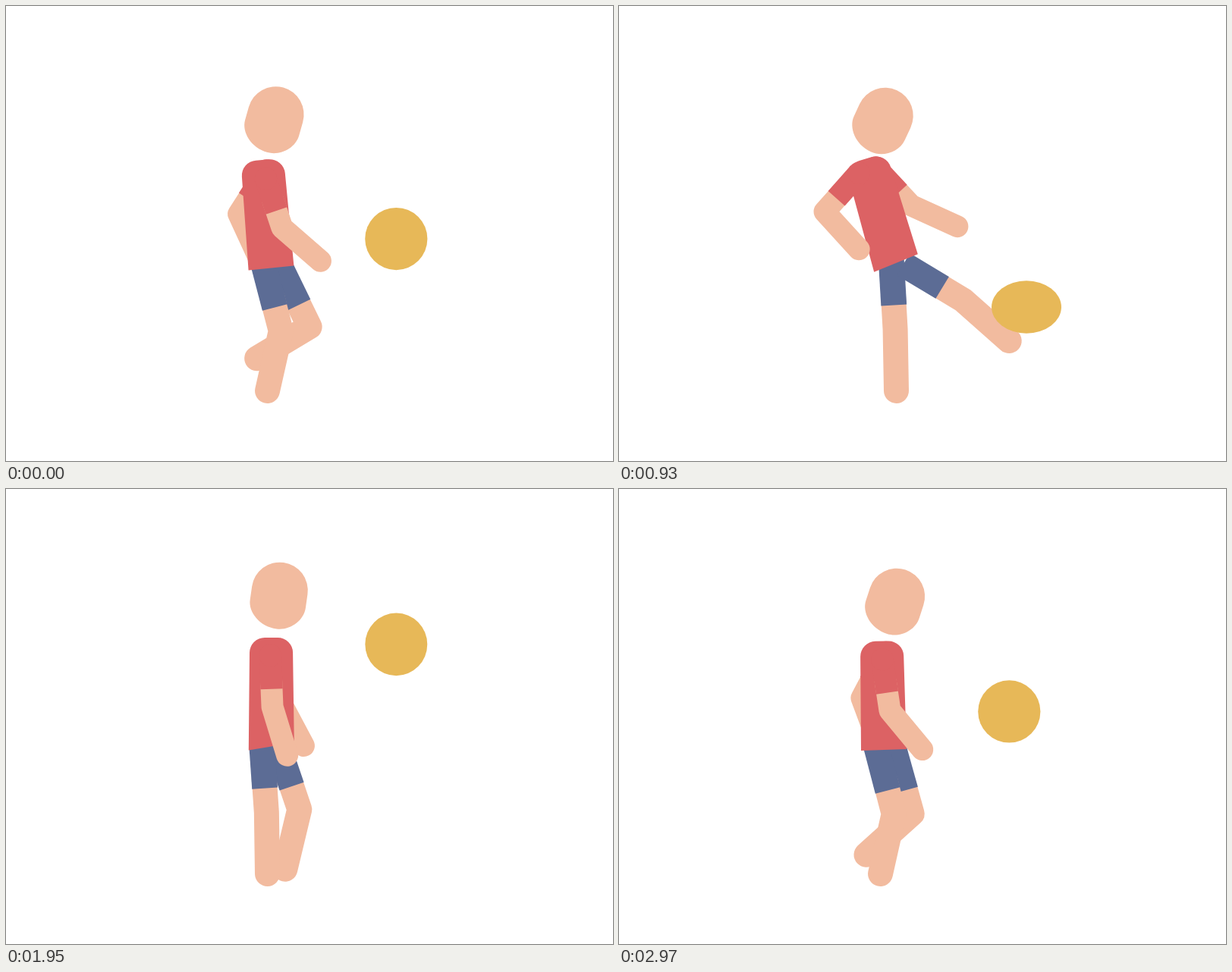
Animation, 800 px wide and 600 px high, one loop 3 s. Source, as an HTML page with a canvas:

```html
<!DOCTYPE html>
<html lang="en">
<head>
<meta charset="utf-8">
<title>Keepy-uppy</title>
<style>
html, body { margin: 0; width: 100%; height: 100%; overflow: hidden; background: #fff; }
canvas { display: block; width: 800px; height: 600px; }
</style>
</head>
<body>
<canvas id="stage" width="800" height="600"></canvas>
<script>
const ctx = document.getElementById('stage').getContext('2d');
const CYCLE = 1500, STEP = 30, FAR_KICK = 180, NEAR_KICK = 930;
const SKIN = '#f2bb9f', SHIRT = '#dc6264', SHORTS = '#5c6c95', BALL = '#e7b858';
const RAD = Math.PI / 180, THIGH = 80, SHIN = 81, GROUND = 507.5;

// Key poses: time, then values. Angles: 0 points down, positive forward.
// Leg (time since its own kick): thigh, shin
const legKeys = [
  [0, 59, 48.5], [140, 45, 14], [270, 18.7, -13.5], [300, 9.2, -4], [560, 14.7, -12.8],
  [750, 3.3, 1], [1030, 4, .8], [1170, 5, -6], [1290, 15.6, -48], [1320, 26, -59], [1380, 43, -60]
];
// Arms: upper, lower
const nearArm = [[0, 18.5, 49], [180, 42, 65], [450, 2.4, 17], [930, -41.6, 42.3],
  [1230, -15.5, 23], [1470, 8.5, 39.6]];
const farArm = [[0, -32.7, 24.8], [180, -41, 42], [450, 3.1, 28], [930, 43, 65.5],
  [1230, 5.5, 20.7], [1470, -27.8, 20.4]];
// Spine: neck x, y, waist x, y, head tilt
const spine = [
  [0, 337.7, 203, 349.5, 345.5, 15.7], [180, 325, 201.5, 365, 339, 25],
  [450, 349.5, 196, 349.8, 339.5, 8], [600, 349, 196, 350, 340, 8],
  [930, 325, 201.5, 365, 339, 25], [1230, 363.2, 196.4, 349, 338, 31],
  [1470, 346.3, 200.7, 349, 344, 18]
];

const mod = t => (t % CYCLE + CYCLE) % CYCLE;
const since = (t, kick) => mod(t - kick + CYCLE / 2) - CYCLE / 2;
const bell = (dt, before, after) => Math.exp(-((dt / (dt < 0 ? before : after)) ** 2));
const clamp = v => Math.min(1, Math.max(0, v));
const along = ([x, y], angle, d) =>
  [x + d * Math.sin(angle * RAD), y + d * Math.cos(angle * RAD)];

// Periodic monotone cubic interpolation
function sample(keys, t) {
  const n = keys.length;
  const key = i => keys[(i + n) % n];
  const time = i => key(i)[0] + Math.floor(i / n) * CYCLE;
  let i = n - 1;
  while (keys[i][0] > t) i--;
  const span = time(i + 1) - time(i), u = (t - time(i)) / span;
  return key(i).slice(1).map((a, c) => {
    const value = j => key(j)[c + 1];
    const slope = j => (value(j + 1) - value(j)) / (time(j + 1) - time(j));
    const tangent = j => {
      const p = slope(j - 1), q = slope(j);
      return p * q > 0 ? 2 * p * q / (p + q) : 0;
    };
    const b = value(i + 1), u2 = u * u, u3 = u2 * u;
    return a + (b - a) * (3 * u2 - 2 * u3)
      + span * (tangent(i) * (u3 - 2 * u2 + u) + tangent(i + 1) * (u3 - u2));
  });
}

function line(points, width, color, cap) {
  ctx.beginPath();
  points.forEach(p => ctx.lineTo(...p));
  ctx.lineWidth = width;
  ctx.lineCap = cap;
  ctx.lineJoin = 'round';
  ctx.strokeStyle = color;
  ctx.stroke();
}

function oval(x, y, rx, ry, color) {
  ctx.beginPath();
  ctx.ellipse(x, y, rx, ry, 0, 0, 7);
  ctx.fillStyle = color;
  ctx.fill();
}

// The bare part starts under the cloth, so only its far end shows
function limb(root, upper, lower, a, b, width) {
  const mid = along(root, upper, a);
  line([along(root, upper, 35), mid, along(mid, lower, b)], width, SKIN, 'round');
  return mid;
}

function drawArm(shoulder, [upper, lower]) {
  const elbow = limb(shoulder, upper, lower, 73, 67, 29);
  const top = along(shoulder, upper, 5);
  line([top, along(elbow, upper, -23.5)], 29.4, SHIRT, 'butt');
  oval(...top, 14.7, 14.7, SHIRT);
}

function drawLeg({ hip, thigh, shin }) {
  const knee = limb(hip, thigh, shin, THIGH, SHIN, 33);
  line([along(hip, thigh, -12), along(knee, thigh, -32)], 33.8, SHORTS, 'butt');
}

// Hip position that keeps the foot planted
function plant(t, kick, footX) {
  const [thigh, shin] = sample(legKeys, mod(t - kick));
  const knee = along([footX, GROUND], shin, -SHIN);
  return { thigh, shin, hip: along(knee, thigh, -THIGH), dt: since(t, kick) };
}

// A lifted leg hangs from the pelvis, which turns with the kick
function hang(leg, support, offset, turn) {
  const lift = clamp((leg.dt + 330) / 60) * clamp((360 - leg.dt) / 90);
  const free = [support.hip[0] + offset + turn * bell(leg.dt, 90, 150), support.hip[1]];
  return { ...leg, hip: leg.hip.map((v, i) => v + (free[i] - v) * lift) };
}

function drawTorso(at, length, t) {
  const twist = 2.75 * (Math.cos((t - 1350) / CYCLE * 2 * Math.PI) - 1);
  const [lx, ly] = at(-30, length), [rx, ry] = at(30, length);
  ctx.beginPath();
  ctx.moveTo(lx, ly - twist);
  ctx.arcTo(...at(-28.3, 0), ...at(28.3, 0), 20);
  ctx.arcTo(...at(28.3, 0), rx, ry + twist, 20);
  ctx.lineTo(rx, ry + twist);
  ctx.fillStyle = SHIRT;
  ctx.fill();
}

function drawHead(x, y, tilt) {
  ctx.save();
  ctx.translate(x + 4.5 + .85 * tilt, y - 65 + .33 * tilt);
  ctx.rotate(tilt * RAD);
  ctx.beginPath();
  ctx.arc(0, 0, 37, Math.PI, 0);
  ctx.lineTo(37, 18);
  ctx.bezierCurveTo(37, 36, 20, 51, 3, 51);
  ctx.bezierCurveTo(-20, 51, -37, 34, -37, 18);
  ctx.fillStyle = SKIN;
  ctx.fill();
  ctx.restore();
}

// Two flights per cycle, each between kicks and with its own peak
function drawBall(t) {
  const high = t >= FAR_KICK && t < NEAR_KICK;
  const peak = high ? 176 : 251.7;
  const u = mod(t - (high ? FAR_KICK : NEAR_KICK)) / 375 - 1;
  const floor = high === u > 0 ? 397 : 390;
  const d = Math.abs(u);
  const y = peak + (floor - peak) * d * d * (2 - d);
  const x = 514.3 + 22.7 * bell(since(t, NEAR_KICK), 90, 90);
  // Flattened at each kick, then stretched on the rebound
  let q = 0;
  for (const kick of [FAR_KICK, NEAR_KICK]) {
    const dt = since(t, kick);
    q += bell(dt, 40, 40) - .5 * bell(dt - 150, 70, 70);
  }
  oval(x, y, 41.1 + 4.9 * q, 41.1 - 6.5 * q, BALL);
}

function draw(t) {
  const [x, y, waistX, waistY, tilt] = sample(spine, t);
  const length = Math.hypot(waistX - x, waistY - y);
  const dx = (waistX - x) / length, dy = (waistY - y) / length;
  // Point across and down the torso from the neck
  const at = (u, v) => [x + u * dy + v * dx, y - u * dx + v * dy];
  const near = plant(t, NEAR_KICK, 344.5), far = plant(t, FAR_KICK, 365.5);
  const arm = sample(nearArm, t);

  ctx.fillStyle = '#fff';
  ctx.fillRect(0, 0, 800, 600);
  drawArm(at(7.5, 10.5), sample(farArm, t));
  drawLeg(hang(far, near, 22.5, 22));
  drawLeg(hang(near, far, -22.5, 48));
  drawTorso(at, length, t);
  drawArm(at(.18 * arm[0] - 2, .12 * arm[0] + 18), arm);
  drawHead(x, y, tilt);
  drawBall(t);
}

const start = performance.now();
function tick() {
  const t = mod(Math.max(0, performance.now() - start));
  draw(Math.floor(t / STEP) * STEP);
  requestAnimationFrame(tick);
}
tick();
</script>
</body>
</html>
```
